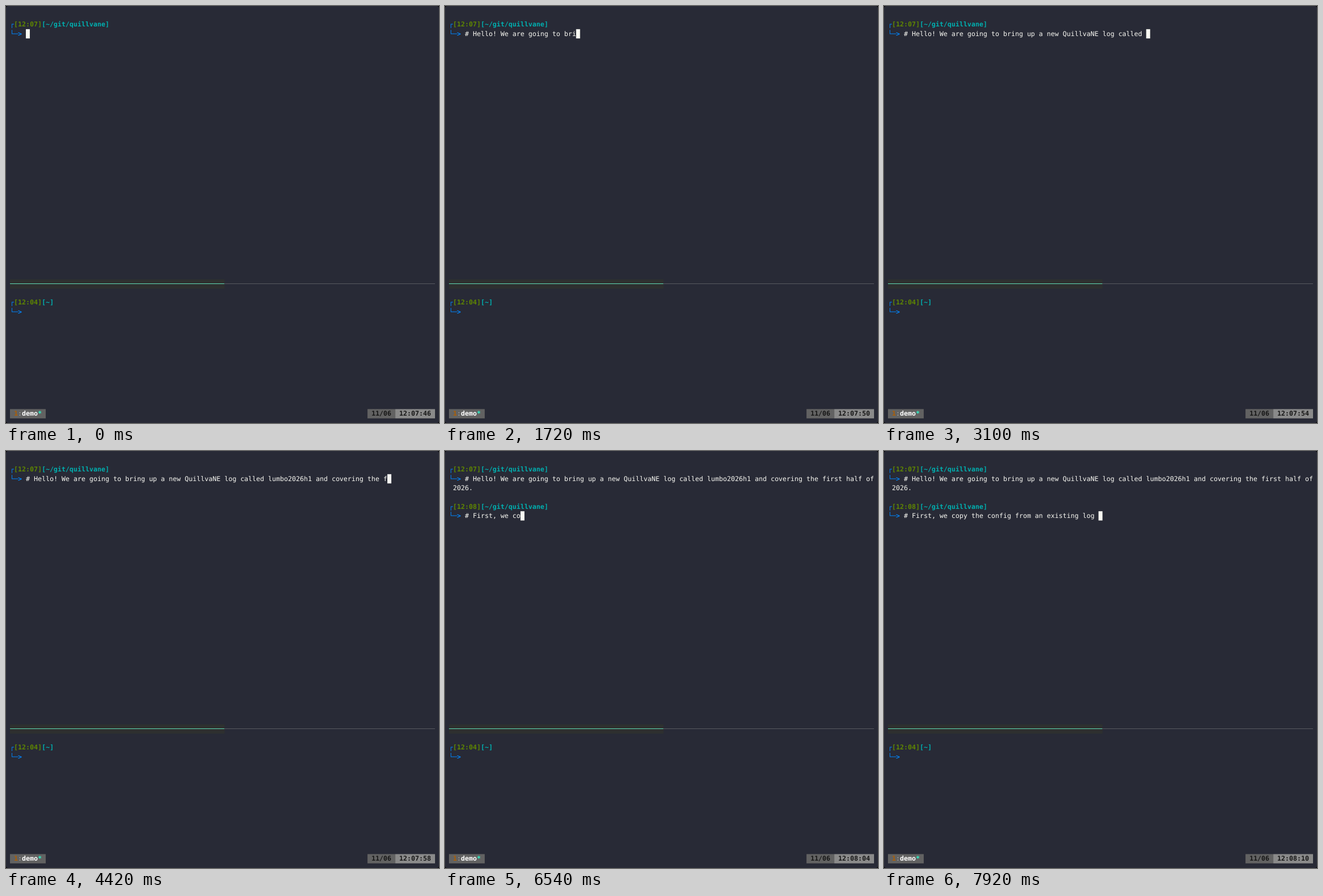
An HTML page that plays this animation: 762x735 px, repeating every 8000 ms.

```html
<!DOCTYPE html>
<html lang="en">
<head>
<meta charset="utf-8">
<title>Terminal session</title>
<style>
  html, body { margin: 0; width: 100%; height: 100%; overflow: hidden; background: #000; }
  svg { display: block; width: 762px; height: 735px; }
  text {
    font: 11.612px 'DejaVu Sans Mono', monospace;
    white-space: pre;
    text-rendering: geometricPrecision;
    fill: #f8f8f2;
  }
  .b { font-weight: bold; }
  .blue { fill: #0087ff; }
  .green { fill: #5f8700; }
  .cyan { fill: #00afaf; }
  .orange { fill: #af5f00; }
  .grey { fill: #a8a8a8; }
  .white { fill: #fff; }
  .mint { fill: #2ff0c8; }
  .dark { fill: #161616; }
</style>
</head>
<body>
<svg id="term" viewBox="0 0 762 735">
  <rect width="762" height="735" rx="4" fill="#282a36"/>
</svg>
<script>
const COLS = 107, ROWS = 44, LOOP = 8000;
const CW = 762 / (COLS + 2), RH = 735 / (ROWS + 1);
const colX = c => (c + 1) * CW;
const rowY = r => (r + 0.5) * RH;
const term = document.getElementById('term');

function add(parent, tag, attrs) {
  const el = document.createElementNS('http://www.w3.org/2000/svg', tag);
  for (const k in attrs) el.setAttribute(k, attrs[k]);
  return parent.appendChild(el);
}

function box(row, col, width, fill) {
  return add(term, 'rect', { x: colX(col), y: rowY(row), width: width * CW, height: RH, fill });
}

// Each part is [text, class]; parts follow one another on the cell grid.
function write(row, col, ...parts) {
  const g = add(term, 'g', {});
  for (const [str, cls = ''] of parts) {
    const el = add(g, 'text', { x: colX(col), y: rowY(row) + RH / 1.4, class: cls });
    el.textContent = str;
    col += str.length;
  }
  return g;
}

function prompt(row, time, dir) {
  return [
    write(row, 0, ['┌', 'b blue'], [`[${time}]`, 'b green'], [`[${dir}]`, 'b cyan']),
    write(row + 1, 0, ['└─>', 'b blue'])
  ];
}

// Pane divider
box(29, 0, 54, '#2e302f');
add(term, 'rect', { x: colX(0), y: 489, width: 54 * CW, height: 1, fill: '#5fdcb8' });
add(term, 'rect', { x: colX(54), y: 489, width: 53 * CW, height: 1, fill: '#575961' });

// Status bar
box(43, 0, 9, '#626262');
box(43, 90, 7, '#626262');
box(43, 97, 10, '#8a8a8a');
write(43, 1, ['1', 'b orange'], [':', 'grey'], ['demo', 'b white'], ['*', 'b mint']);
write(43, 91, ['11/06', 'b dark']);
const clock = write(43, 98, ['', 'b dark']).firstChild;

// Panes
prompt(1, '12:07', '~/git/quillvane');
prompt(31, '12:04', '~');
const second = prompt(5, '12:08', '~/git/quillvane');
const [lineA, lineB, lineC] = [[2, 4], [3, 0], [6, 4]].map(([r, c]) => write(r, c, ['']).firstChild);
const cursor = box(2, 4, 1, '#f8f8f2');

const FIRST = '# Hello! We are going to bring up a new QuillvaNE log called lumbo2026h1 and covering the first half of 2026.';
const SECOND = '# First, we copy the config from an existing log ';
const WRAP = COLS - 4;

// Bursts of typing: time of first key, time of last key, number of keys
const BURSTS = [
  [300, 500, 5], [700, 960, 5], [1150, 1720, 18], [1750, 1940, 8],
  [1970, 2320, 10], [2520, 3100, 15], [3140, 3290, 4], [3330, 3420, 4],
  [3800, 4420, 22], [4450, 4590, 5], [4620, 4710, 3], [4850, 4900, 2],
  [5050, 5260, 8], [5340, 5480, 3], [5910, 6230, 10], [6470, 6750, 6],
  [6910, 7260, 17], [7300, 7700, 10], [7770, 7920, 4]
];

function keysAt(t) {
  let sum = 0;
  for (const [from, to, n] of BURSTS) {
    if (t < from) break;
    sum += Math.min(n, 1 + Math.floor((t - from) / (to - from) * (n - 1) + 1e-6));
  }
  return sum;
}

// The status bar refreshes every two seconds of sped-up time.
function clockAt(t) {
  const ticks = Math.max(0, Math.floor((t - 662) / 658) + 1);
  const s = 7 * 60 + 46 + 2 * ticks;
  const pad = v => String(v).padStart(2, '0');
  return `12:${pad(Math.floor(s / 60))}:${pad(s % 60)}`;
}

function draw(t) {
  const keys = keysAt(t);
  const entered = keys > FIRST.length;
  const a = FIRST.slice(0, keys);
  const c = entered ? SECOND.slice(0, keys - FIRST.length - 1) : '';
  lineA.textContent = a.slice(0, WRAP);
  lineB.textContent = a.slice(WRAP);
  lineC.textContent = c;
  for (const g of second) g.setAttribute('visibility', entered ? 'visible' : 'hidden');

  let row = 2, col = 4 + a.length;
  if (entered) [row, col] = [6, 4 + c.length];
  else if (a.length >= WRAP) [row, col] = [3, a.length - WRAP];
  cursor.setAttribute('x', colX(col));
  cursor.setAttribute('y', rowY(row));
  clock.textContent = clockAt(t);
}

const start = performance.now();
function frame() {
  draw((performance.now() - start) % LOOP);
  requestAnimationFrame(frame);
}
draw(0);
requestAnimationFrame(frame);
</script>
</body>
</html>
```
